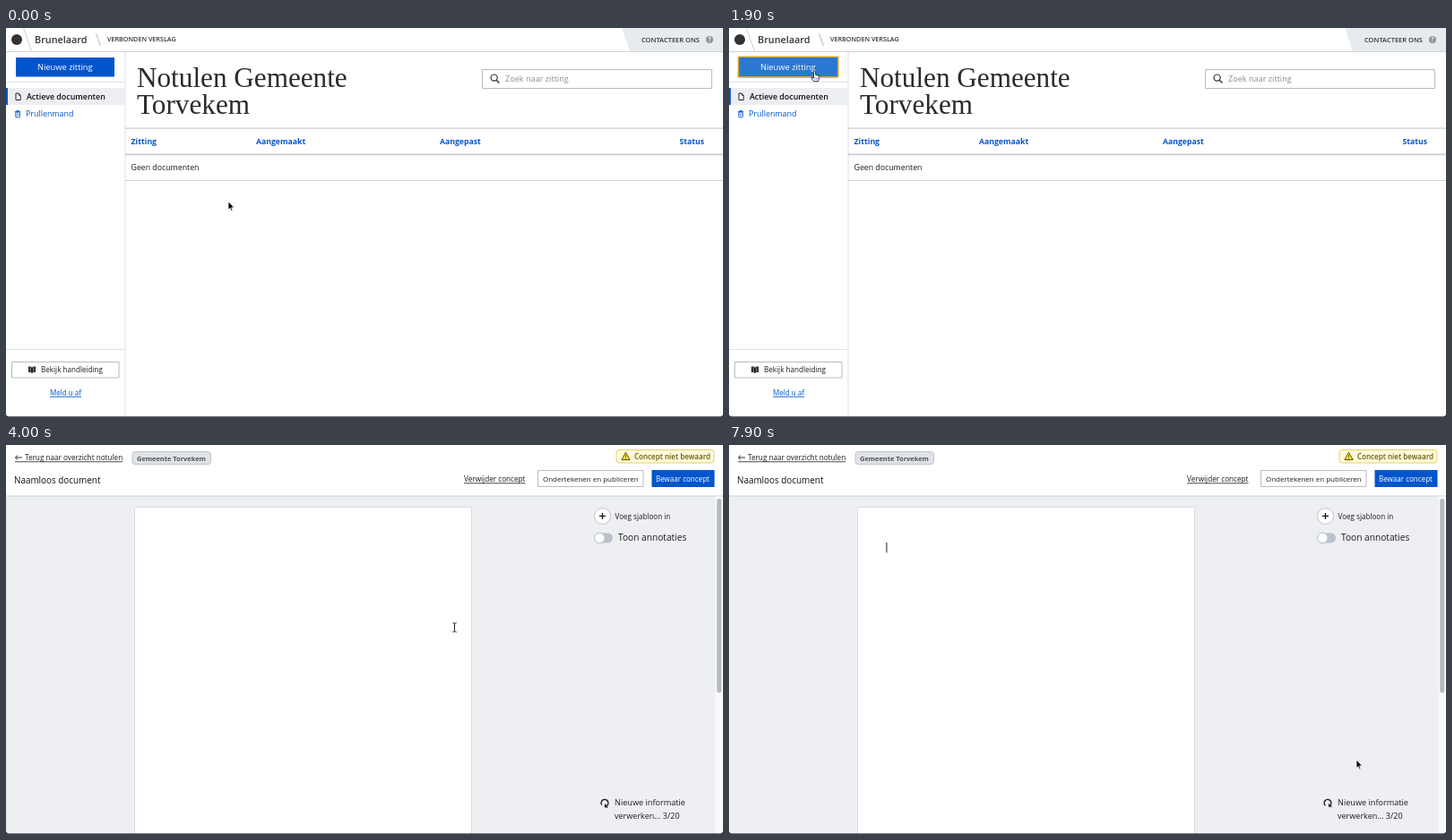
Animation of 800x435 px, one loop 8 s. Source, as an HTML page with a canvas:

```html
<!DOCTYPE html>
<html lang="nl">
<head>
<meta charset="utf-8">
<title>Notulen</title>
<style>
  html, body { margin: 0; width: 100%; height: 100%; overflow: hidden; background: #fff; }
  canvas { display: block; width: 800px; height: 435px; }
</style>
</head>
<body>
<canvas id="stage" width="800" height="435"></canvas>
<script>
const ctx = document.getElementById('stage').getContext('2d');
const LOOP = 8000, STEP = 100;
const HOVER = 1200, FOCUS = 1700, OPEN = 3500;
const SANS = '"Open Sans", "Noto Sans", sans-serif';
const SERIF = '"Liberation Serif", serif';
const BLUE = '#0055cc', INK = '#1c1c1c', LINE = '#cbd2d9', FRAME = '#b4bcc6';

// time, x, y of the pointer hot spot
const PATH = [
  [400, 248, 194], [1300, 95.5, 48.5], [1900, 95.5, 48.5], [2200, 194, 81],
  [2500, 194, 81], [2900, 211, 85], [3200, 211, 85], [3900, 500.5, 204],
  [4300, 500.5, 204], [5300, 682.5, 409.5], [5500, 682.5, 409.5], [6200, 700, 352]
];

function text(str, x, y, size, { color = INK, weight = 400, family = SANS, underline = false } = {}) {
  ctx.font = `${weight} ${size}px ${family}`;
  ctx.fillStyle = color;
  ctx.fillText(str, x, y);
  if (underline) rect(x, y + 1.4, ctx.measureText(str).width, 0.8, color);
}

function rect(x, y, w, h, color) {
  ctx.fillStyle = color;
  ctx.fillRect(x, y, w, h);
}

function box(x, y, w, h, fill, stroke, r = 0, lw = 1) {
  ctx.beginPath();
  ctx.roundRect(x, y, w, h, r);
  paint(fill, stroke, lw);
}

function circle(x, y, r, fill, stroke, lw = 1) {
  ctx.beginPath();
  ctx.arc(x, y, r, 0, Math.PI * 2);
  paint(fill, stroke, lw);
}

function poly(points, fill, stroke, lw = 1, close = true) {
  ctx.beginPath();
  points.forEach(([x, y]) => ctx.lineTo(x, y));
  if (close) ctx.closePath();
  paint(fill, stroke, lw);
}

function line(x1, y1, x2, y2, color, lw = 1) {
  poly([[x1, y1], [x2, y2]], null, color, lw, false);
}

function paint(fill, stroke, lw) {
  if (fill) { ctx.fillStyle = fill; ctx.fill(); }
  if (stroke) { ctx.strokeStyle = stroke; ctx.lineWidth = lw; ctx.stroke(); }
}

function at(x, y, draw, angle = 0) {
  ctx.save();
  ctx.translate(x, y);
  ctx.rotate(angle);
  draw();
  ctx.restore();
}

function pointer(t) {
  const i = PATH.findIndex(p => p[0] > t);
  if (i === 0) return PATH[0].slice(1);
  if (i < 0) return PATH[PATH.length - 1].slice(1);
  const [t0, x0, y0] = PATH[i - 1], [t1, x1, y1] = PATH[i];
  const u = (t - t0) / (t1 - t0), e = u * u * (3 - 2 * u);
  return [x0 + (x1 - x0) * e, y0 + (y1 - y0) * e];
}

function arrow() {
  poly([[0, 0], [0, 9.4], [2.1, 7.5], [3.5, 10.7], [5, 10], [3.6, 6.9], [6.5, 6.7]], '#000', '#fff', 0.8);
}

function hand() {
  poly([[-1, 0.3], [0, -0.2], [1, 0.5], [1.2, 4], [4.3, 4.6], [5, 6], [4.6, 9], [3.8, 11.2],
    [-1, 11.2], [-3.6, 7.5], [-3.2, 6.4], [-1, 7.5]], '#fff', '#222', 0.9);
  for (const x of [0.2, 1.7, 3.2]) line(x, 7, x, 9.4, '#444', 0.5);
}

function beam() {
  for (const [color, lw] of [['#fff', 2], ['#222', 1]]) {
    line(0, -4, 0, 4, color, lw);
    for (const s of [-1, 1]) {
      poly([[-2.2, 5.2 * s], [-0.8, 5 * s], [0, 4 * s], [0.8, 5 * s], [2.2, 5.2 * s]], null, color, lw, false);
    }
  }
}

function drawCursor(t) {
  const [x, y] = pointer(t);
  let shape = arrow;
  if (t >= OPEN) shape = x < 519 ? beam : arrow;
  else if (t >= 2600) shape = beam;
  else if (t >= HOVER) shape = hand;
  at(x, y, shape);
}

function drawTopBar() {
  rect(0, 26, 800, 1, LINE);
  circle(12, 13, 6, '#333');
  line(19.5, 0, 28.5, 26, LINE);
  text('Brunelaard', 32, 17, 10.8, { weight: 600, color: '#333' });
  line(100.5, 6, 105.5, 20, '#b5bcc5');
  text('VERBONDEN VERSLAG', 113, 15.3, 7.2, { weight: 600, color: '#333' });
  poly([[687, 0], [800, 0], [800, 26], [696, 26]], '#e8ebee');
  text('CONTACTEER ONS', 709, 15.5, 7.5, { weight: 600, color: '#333' });
  circle(785, 13, 4, '#8b949e');
  text('?', 783.4, 15.4, 6.5, { weight: 700, color: '#fff' });
}

function drawSidebar(t) {
  rect(132.5, 27, 1, 408, '#dde1e6');
  const focused = t >= FOCUS;
  box(11, 33, 110, 21.5, focused ? '#2a78d2' : t >= HOVER ? '#0f61cd' : BLUE);
  if (focused) box(10.5, 32.3, 111.2, 22.6, null, '#cfa62b', 1, 1.6);
  text('Nieuwe zitting', 35, 47, 9.3, { color: '#fff' });
  rect(0, 60, 133, 1, '#dde1e6');

  rect(0, 67, 133, 19, '#eceef1');
  rect(0, 67, 2, 19, BLUE);
  poly([[11, 73], [14, 73], [16.2, 75.2], [16.2, 80.5], [11, 80.5]], '#fff', '#222');
  poly([[14, 73], [14, 75.3], [16.2, 75.3]], null, '#222', 0.7, false);
  text('Actieve documenten', 23, 80, 8.9, { weight: 600, color: '#111' });

  box(10.8, 94, 4.6, 6, null, BLUE, 1, 0.9);
  line(9.8, 93.7, 16.3, 93.7, BLUE);
  line(11.8, 92.4, 14.4, 92.4, BLUE);
  line(12.4, 95.5, 12.4, 98.5, BLUE, 0.6);
  line(13.9, 95.5, 13.9, 98.5, BLUE, 0.6);
  text('Prullenmand', 22, 99.3, 8.9, { color: BLUE });

  rect(0, 359, 133, 1, '#dde1e6');
  box(6.5, 373.5, 119.5, 17.5, '#fff', FRAME);
  poly([[25, 378.5], [27.3, 378.5], [29, 379.5], [30.7, 378.5], [33, 378.5], [33, 385],
    [30.7, 385], [29, 386], [27.3, 385], [25, 385]], '#222');
  line(27.2, 378.5, 27.2, 385, '#fff', 0.5);
  line(30.8, 378.5, 30.8, 385, '#fff', 0.5);
  text('Bekijk handleiding', 39, 385.2, 8.1);
  text('Meld u af', 49, 410.8, 8.05, { color: BLUE, underline: true });
}

function drawOverview(t) {
  drawTopBar();
  drawSidebar(t);
  const title = { family: SERIF, color: '#2b2b2b' };
  text('Notulen Gemeente', 146, 66, 31.2, title);
  text('Torvekem', 146, 95.5, 31.2, title);

  box(531.5, 46.5, 256, 21, '#fff', FRAME);
  circle(544.6, 55.6, 3.6, null, '#333', 1.2);
  line(547.2, 58.2, 550.4, 61.4, '#333', 1.4);
  text('Zoek naar zitting', 557, 60, 9.15, { color: '#8b8f94' });

  rect(133, 111.5, 667, 1.2, '#c5ccd3');
  rect(133, 140.5, 667, 1.7, '#c5ccd3');
  rect(133, 170, 667, 1, '#cfd5da');
  const heads = { Zitting: 139.5, Aangemaakt: 279, Aangepast: 484, Status: 751.5 };
  for (const name in heads) text(name, heads[name], 130, 8.7, { weight: 700, color: BLUE });
  text('Geen documenten', 139.5, 159.4, 8.77);

  if (t >= 2100 && t < 2800) {
    box(0, 422, 266, 14, '#2b2b2d', null, [0, 3, 0, 0]);
    text('localhost:4200/inbox', 2, 431.5, 7.6, { color: '#c4c4c6' });
  }
}

function drawEditorHeader() {
  rect(0, 0, 800, 57, '#fff');
  rect(0, 56.5, 800, 1, LINE);
  line(10.5, 14, 18, 14, INK, 0.9);
  poly([[13, 11.6], [10.5, 14], [13, 16.4]], null, INK, 0.9, false);
  rect(10, 18.4, 11, 0.8, INK);
  text('Terug naar overzicht notulen', 21, 17, 8.18, { underline: true });
  box(141, 7.5, 87.5, 14, '#dfe2e6', '#bfc5cc', 3);
  text('Gemeente Torvekem', 146, 17.6, 7.45, { weight: 700, color: '#4d535a' });
  text('Naamloos document', 9, 43, 9.9, { weight: 500, color: '#111' });

  text('Verwijder concept', 511, 41, 8.2, { underline: true });
  box(593.5, 28.5, 117.5, 18, '#fff', FRAME);
  text('Ondertekenen en publiceren', 599, 41, 7.97);
  rect(720.5, 28, 70, 19, BLUE);
  text('Bewaar concept', 725, 41.2, 8.05, { weight: 500, color: '#fff' });

  box(681, 5.5, 109, 14.5, '#fff9d8', '#e6d268', 3);
  poly([[691.5, 8.2], [696, 16.5], [687, 16.5]], '#ffe24a', '#5f5200', 1);
  line(691.5, 11, 691.5, 13.8, '#5f5200', 0.9);
  rect(691, 14.6, 1, 1, '#5f5200');
  text('Concept niet bewaard', 701, 15.8, 8.05, { weight: 600, color: '#665a10' });
}

function drawSpinner(t) {
  const angle = Math.PI * (t - 5400) / 1000 - 0.08;
  at(668, 400.3, () => {
    ctx.beginPath();
    ctx.arc(0, 0, 3.9, Math.PI * 0.25, Math.PI * 1.76);
    paint(null, '#222', 1.5);
    poly([[4.6, -4.9], [4.6, -0.7], [0.4, -0.7]], '#222');
  }, angle);
}

function drawEditor(t) {
  rect(0, 57, 800, 378, '#edeff2');
  drawEditorHeader();

  box(143.5, 69.5, 376, 380, '#fff', '#d6dae0', 1);
  if (t % 1000 >= 500) rect(175.4, 109, 1, 11.5, '#222');

  circle(665.5, 79.5, 9, '#fff', '#bcc3cb');
  line(662, 79.5, 669, 79.5, INK, 1.4);
  line(665.5, 76, 665.5, 83, INK, 1.4);
  text('Voeg sjabloon in', 679.5, 82.6, 8.08);

  box(656.5, 98.5, 20.5, 11, '#bac1cc', null, 5.5);
  circle(662.3, 104, 5.8, '#fff', '#b4bcc8');
  text('Toon annotaties', 683, 107.3, 10.16);

  drawSpinner(t);
  text('Nieuwe informatie', 679, 403.2, 9.13);
  text('verwerken… 3/20', 679, 418.2, 9.06);

  rect(791.5, 57.5, 8.5, 378, '#f8f9fa');
  box(793.2, 60, 5, 217, '#b7babd', null, 2.5);
}

function drawWindowEdge() {
  rect(0, 434.3, 800, 0.7, '#4a4c50');
  poly([[0, 432.5], [2.5, 435], [0, 435]], '#333');
  poly([[800, 432.5], [797.5, 435], [800, 435]], '#333');
}

function frame(now) {
  const t = Math.floor((now % LOOP) / STEP) * STEP;
  rect(0, 0, 800, 435, '#fff');
  (t < OPEN ? drawOverview : drawEditor)(t);
  drawCursor(t);
  drawWindowEdge();
}

const start = performance.now();
function tick() {
  frame(performance.now() - start);
  requestAnimationFrame(tick);
}
tick();
</script>
</body>
</html>
```
